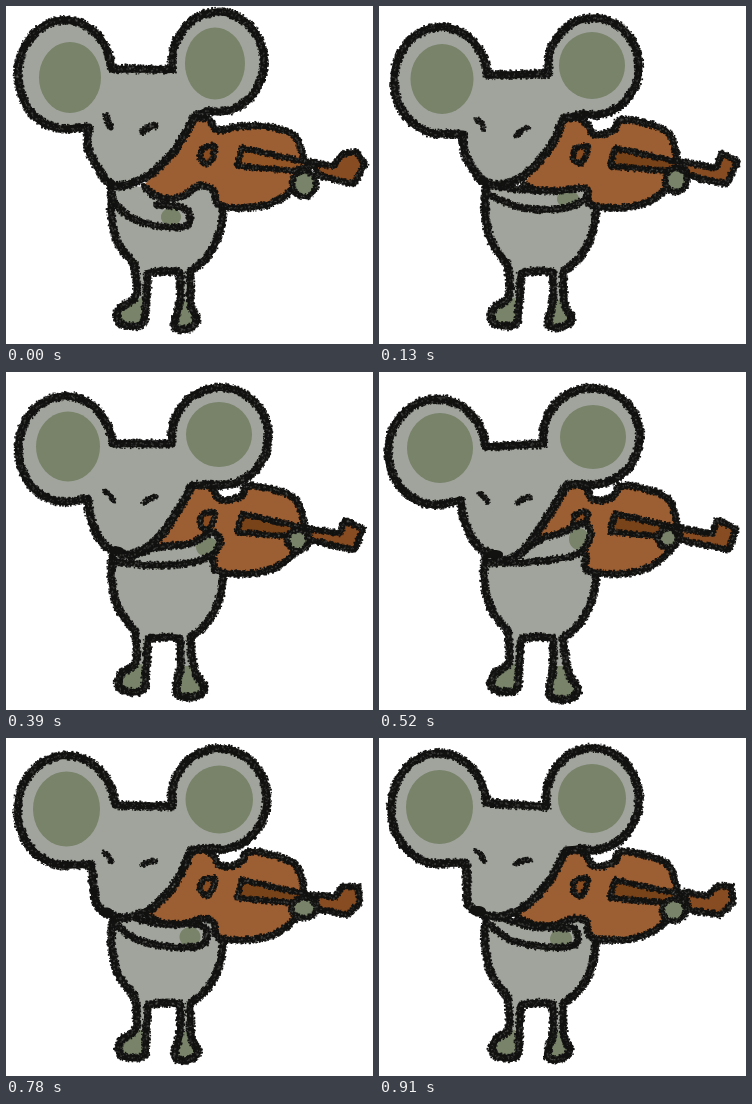
Animation, 367 px wide and 338 px high, one loop 1040 ms. Source, as an HTML page with a canvas:

```html
<!DOCTYPE html>
<html lang="en">
<head>
<meta charset="utf-8">
<title>Mouse playing the violin</title>
<style>
html, body { margin: 0; width: 100%; height: 100%; overflow: hidden; background: #fff; }
canvas { display: block; width: 367px; height: 338px; }
</style>
</head>
<body>
<canvas id="stage" width="367" height="338"></canvas>
<script>
const ctx = document.getElementById('stage').getContext('2d');
const STEP = 130;
// Key index for each drawing; halves are in-betweens.
const KEYS = [0, 1, 2, 2.5, 3, 4, 4.5, 5];

const INK = '#121211', FUR = '#a1a49c', GREEN = '#78836a';
const WOOD = '#9c5f33', BOARD = '#794319', SCROLL = '#874c21';

// Ellipses as cx, cy, rx, ry: left ear, right ear.
const EARS = [
  [59, 68.5, 47, 54.5, 212, 56, 46, 50],
  [62, 74.5, 47, 53.5, 214.5, 60.5, 45.5, 48.5],
  [61, 74, 45.5, 53, 215.5, 64.5, 48.5, 49.5],
  [58, 80, 49, 53, 212.5, 64.5, 48.5, 48.5],
  [61, 74.5, 50, 54.5, 213, 61, 49, 50],
  [60, 70.5, 48, 55.5, 213.5, 61, 46.5, 51]
];
const INNER = [
  [64, 71.5, 31, 35.5, 209, 57.5, 30, 36],
  [63, 73, 31.5, 35, 213, 59.5, 33, 33.5],
  [63, 73, 31, 35, 212, 60, 33, 33],
  [61, 76, 33, 35, 214, 65, 33, 32],
  [60.5, 73, 33.5, 38, 213.5, 62.5, 33.5, 33.5],
  [60.5, 69, 33.5, 37, 213, 60.5, 34, 34.5]
];
// Left cheek, chin and jaw as x, y pairs.
const JAW = [
  [83, 121, 82, 142, 92, 162, 102, 176, 114, 180, 140, 171, 163, 151, 178, 130, 188, 111],
  [84, 128, 86, 148, 96, 166, 104, 175, 118, 179, 140, 173, 160, 155, 175, 135, 184, 113],
  [82, 125, 84, 145, 92, 165, 102, 175, 118, 178, 145, 170, 163, 152, 176, 130, 184, 115],
  [82, 128, 85, 148, 97, 172, 110, 181, 130, 188, 150, 172, 165, 150, 178, 130, 187, 113],
  [84, 128, 87, 150, 93, 167, 103, 177, 120, 181, 145, 172, 165, 152, 176, 132, 184, 112],
  [87, 125, 88, 148, 89, 166, 100, 174, 120, 179, 145, 169, 165, 150, 178, 130, 187, 112]
];
const NOSE = [
  [105, 177, 4, 4], [104, 175, 6, 4], [105, 175, 7, 4],
  [116, 182, 8, 4], [102, 176, 5, 5], [99, 173, 8, 5]
];
const EYES = [
  [100, 110, 102, 116, 105, 122, 136, 126, 143, 121, 150, 120],
  [97, 113, 102, 117, 105, 124, 137, 130, 143, 124, 149, 122],
  [98, 116, 103, 121, 106, 128, 138, 131, 144, 126, 150, 124],
  [100, 121, 105, 125, 109, 131, 138, 131, 144, 127, 152, 125],
  [99, 116, 103, 121, 107, 125, 137, 128, 143, 125, 149, 124],
  [97, 113, 102, 117, 105, 124, 136, 126, 143, 123, 152, 122]
];
// Bowing arm: upper edge, hand, lower edge back to the shoulder.
const ARM = [
  [150, 199, 168, 200, 182, 205, 182, 219, 160, 221, 128, 213, 110, 198, 104, 182],
  [120, 181, 150, 184, 180, 185, 205, 182, 206, 193, 180, 203, 140, 201, 107, 187],
  [118, 181, 150, 181, 185, 183, 208, 170, 216, 180, 195, 193, 150, 197, 107, 187],
  [136, 186, 158, 169, 184, 160, 206, 151, 211, 166, 196, 183, 150, 190, 107, 191],
  [140, 183, 165, 185, 188, 182, 203, 190, 197, 207, 165, 209, 130, 201, 108, 186],
  [125, 180, 150, 188, 180, 190, 196, 191, 196, 207, 165, 209, 130, 201, 108, 184]
];
const PALM = [
  [165, 211, 10, 9], [189, 193, 11, 9], [202, 183, 12, 9],
  [200, 167, 10, 11], [186, 197, 10, 10], [182, 201, 11, 10]
];
const HAND = [
  [298, 178, 12, 13], [297, 174, 11, 12], [295, 171, 11, 11],
  [289, 166, 10, 10], [301, 168, 14, 9], [295, 172, 12, 11]
];
const NECK = [
  [305, 156, 328, 160, 336, 148, 351, 146, 359, 158, 348, 178, 314, 170],
  [305, 156, 337, 162, 342, 147, 359, 156, 347, 178, 330, 175, 308, 169],
  [305, 157, 335, 161, 339, 148, 357, 157, 347, 178, 330, 174, 306, 168],
  [300, 156, 333, 162, 338, 148, 357, 157, 350, 178, 330, 174, 302, 168],
  [310, 159, 330, 160, 335, 148, 353, 150, 353, 165, 342, 177, 316, 171],
  [305, 154, 328, 158, 338, 148, 352, 148, 354, 165, 341, 177, 310, 172]
];
// Lower left edge of the violin, where it meets the arm.
const EDGE = [
  [213, 199, 207, 184, 193, 180, 172, 192, 150, 190, 138, 180],
  [212, 199, 207, 190, 195, 188, 180, 190, 160, 186, 145, 178],
  [212, 199, 207, 190, 195, 187, 180, 188, 160, 186, 145, 178],
  [208, 198, 207, 184, 198, 178, 185, 176, 165, 176, 150, 174],
  [212, 199, 207, 184, 193, 181, 178, 186, 160, 184, 145, 178],
  [212, 199, 207, 183, 193, 181, 172, 188, 150, 185, 138, 178]
];
// Shift of left foot x, right foot x, right foot y, left hip x.
const FEET = [
  [-1, -2, 2, -1], [0, 0, 0, 0], [0, 5, 1, 0],
  [0, 6, 6, -1], [0, 0, 2, -1], [1, -2, 0, 0]
];

let seed = 1;
function rnd() {
  seed = (seed * 16807) % 2147483647;
  return seed / 2147483647;
}

function at(table, k) {
  const a = table[Math.floor(k)], b = table[Math.ceil(k)], f = k % 1;
  return a.map((v, i) => v + (b[i] - v) * f);
}

function pairs(row) {
  const out = [];
  for (let i = 0; i < row.length; i += 2) out.push([row[i], row[i + 1]]);
  return out;
}

function curve(row) {
  const p = pairs(row), out = [];
  for (let i = 0; i < p.length - 1; i++) {
    const a = p[i - 1] || p[i], b = p[i], c = p[i + 1], d = p[i + 2] || c;
    for (let t = 0; t < 1; t += 0.125) {
      out.push([0, 1].map(j => b[j] + 0.5 * t * (c[j] - a[j] +
        t * (2 * a[j] - 5 * b[j] + 4 * c[j] - d[j] +
        t * (3 * (b[j] - c[j]) + d[j] - a[j])))));
    }
  }
  out.push(p[p.length - 1]);
  return out;
}

function arc([cx, cy, rx, ry], from = 0, to = Math.PI * 2) {
  const out = [];
  for (let i = 0; i <= 40; i++) {
    const a = from + (to - from) * i / 40;
    out.push([cx + rx * Math.cos(a), cy + ry * Math.sin(a)]);
  }
  return out;
}

function trace(pts) {
  ctx.beginPath();
  pts.forEach(([x, y]) => ctx.lineTo(x, y));
}

function fill(pts, color) {
  trace(pts);
  ctx.fillStyle = color;
  ctx.fill();
}

function fillInside(shape, pts, color) {
  ctx.save();
  trace(shape);
  ctx.clip();
  fill(pts, color);
  ctx.restore();
}

// Charcoal line: solid core, ragged rim, pale grain.
function ink(pts, w) {
  trace(pts);
  ctx.strokeStyle = INK;
  ctx.lineWidth = w - 1;
  ctx.stroke();
  const dot = (x, y, r, color) => {
    const a = rnd() * Math.PI * 2, s = 0.8 + rnd() * 1.2;
    ctx.fillStyle = color;
    ctx.fillRect(x + r * Math.cos(a) - s / 2, y + r * Math.sin(a) - s / 2, s, s);
  };
  for (let i = 1; i < pts.length; i++) {
    const [x0, y0] = pts[i - 1], [x1, y1] = pts[i];
    const n = Math.ceil(Math.hypot(x1 - x0, y1 - y0));
    for (let j = 0; j < n; j++) {
      const x = x0 + (x1 - x0) * j / n, y = y0 + (y1 - y0) * j / n;
      for (let q = 0; q < 3; q++) dot(x, y, w / 2 - 0.4 + rnd() * 1.2, INK);
      if (rnd() < 0.6) dot(x, y, rnd() * w * 0.45, 'rgba(130,132,125,.3)');
    }
  }
}

function outline(pts, color, w) {
  fill(pts, color);
  ink([...pts, pts[0]], w);
}

function drawBody(k) {
  const [lx, rx, ry, hip] = at(FEET, k);
  const shape = [
    ...curve([107, 180, 106 + hip, 205, 112 + hip, 235, 128, 258]),
    ...curve([129, 260, 130, 290, 116 + lx, 301, 112 + lx, 312, 119 + lx, 319, 137 + lx, 318, 140, 298, 142, 267]),
    ...curve([142, 267, 158, 265, 174, 266]),
    ...curve([174, 268, 174, 295, 169 + rx / 3, 318 + ry, 184 + rx, 321 + ry, 193 + rx, 312 + ry, 186 + rx / 2, 299, 184, 266]),
    ...curve([184, 266, 201, 251, 213, 228, 217, 200, 210, 182])
  ];
  fill(shape, FUR);
  fillInside(shape, [[100, 296], [136, 292], [150, 330], [166, 330], [172, 294], [210, 294], [210, 338], [100, 338]], GREEN);
  ink(shape, 7.5);
}

function drawViolin(k) {
  const top = k === 0
    ? [188, 112, 203, 113, 211, 124, 230, 121, 257, 120, 286, 128, 296, 146]
    : [186, 113, 199, 112, 208, 118, 213, 127, 225, 128, 236, 123, 241, 114, 262, 116, 287, 125, 296, 142];
  const shape = curve([...top, 297, 162, 288, 182, 266, 197, 238, 202, ...at(EDGE, k)]);
  fill(shape, WOOD);
  ink(shape, 6.5);
  outline(curve([194, 153, 196, 143, 208, 140, 207, 150, 201, 158, 194, 153]), '#8a4d22', 5);
  outline(pairs([236, 142, 309, 158, 287, 165, 231, 160]), k === 0 ? '#925526' : BOARD, 5.5);
  outline(pairs(at(NECK, k)), SCROLL, 6);
  outline(arc(at(HAND, k)), GREEN, 5);
}

function drawArm(k) {
  const shape = curve(at(ARM, k));
  fill(shape, FUR);
  fillInside(shape, arc(at(PALM, k)), GREEN);
  ink(shape, 6.5);
}

function drawHead(k) {
  const ears = at(EARS, k), inner = at(INNER, k), eyes = at(EYES, k);
  const shape = [
    ...arc(ears.slice(0, 4), -0.1, 1.45 - Math.PI * 2),
    ...curve(at(JAW, k)),
    ...arc(ears.slice(4), 1.8, -Math.PI - 0.15)
  ];
  fill(shape, FUR);
  fill(arc(inner.slice(0, 4)), GREEN);
  fill(arc(inner.slice(4)), GREEN);
  ink([...shape, shape[0]], 8);
  fill(arc(at(NOSE, k)), INK);
  ink(curve(eyes.slice(0, 6)), k === 0 ? 6 : 4.5);
  ink(curve(eyes.slice(6)), k === 0 ? 6 : 4.5);
}

function draw(i) {
  seed = 977 * (i + 3);
  ctx.fillStyle = '#fff';
  ctx.fillRect(0, 0, 367, 338);
  [drawBody, drawViolin, drawArm, drawHead].forEach(part => part(KEYS[i]));
}

ctx.lineCap = ctx.lineJoin = 'round';
let shown = -1;
function tick(now) {
  const i = Math.floor(now / STEP) % KEYS.length;
  if (i !== shown) draw(shown = i);
  requestAnimationFrame(tick);
}
tick(performance.now());
</script>
</body>
</html>
```
